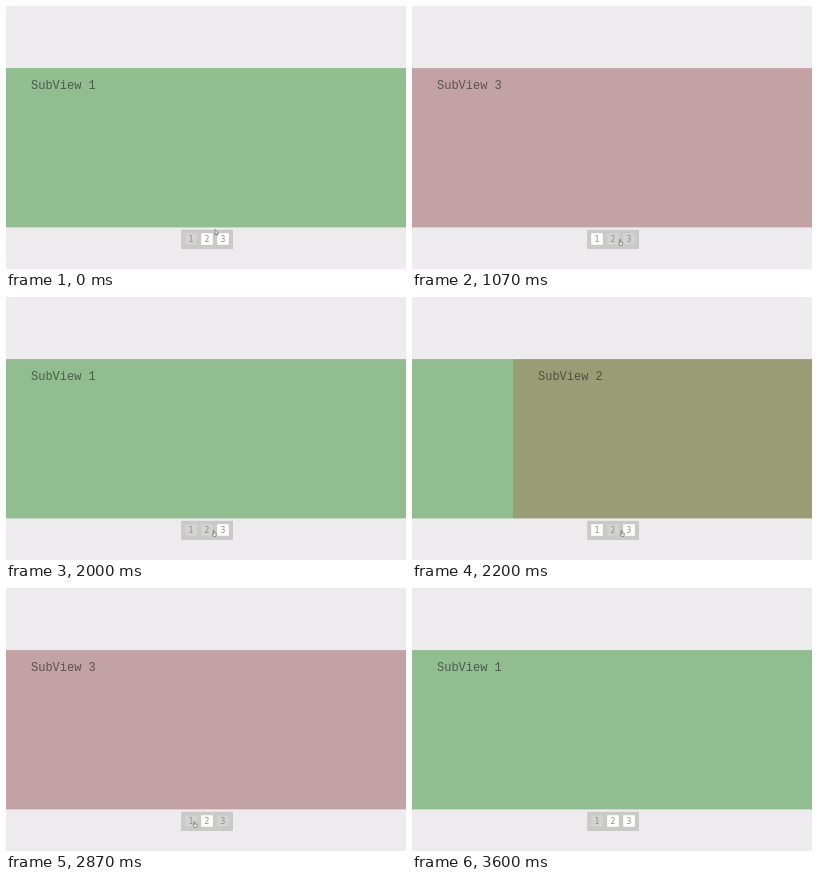
Write an HTML page with a canvas that moves like this. It is 400 by 263 pixels and loops after 4140 ms.

```html
<!DOCTYPE html>
<html lang="en">
<head>
<meta charset="utf-8">
<title>Sliding subviews</title>
<style>
  html, body { margin: 0; width: 100%; height: 100%; overflow: hidden; background: #edebee; }
  canvas { display: block; }
</style>
</head>
<body>
<canvas width="400" height="263"></canvas>
<script>
const ctx = document.querySelector('canvas').getContext('2d');
const LOOP = 4140, STEPS_PER_MS = 0.015, WIDTH = 400;
const SLIDE_STEPS = 2, TRAVEL_STEPS = 5, EXIT_STEP = 48;
const colors = ['#91bd90', '#999d76', '#c2a2a4'];
const clicks = [
  { at: 6.56, view: 1 }, { at: 14, view: 2 }, { at: 24.25, view: 0 },
  { at: 31.67, view: 1 }, { at: 39, view: 2 }, { at: 45.5, view: 0 }
];

// After each click the pointer heads for the next button, and finally out of the top
const buttonTips = [184, 206.5, 219];
const moves = clicks.map(({ view }, i) => ({
  at: i ? clicks[i - 1].at : 0, x: buttonTips[view], y: 233
}));
moves.push({ at: EXIT_STEP, x: 211, y: 3 });

const arrow = new Path2D('M0 0V7L1.6 5.6L2.7 8L3.8 7.4L2.8 5.2H5Z');
const hand = new Path2D('M1 0H2V3L5 3.8V6L4 8H1.3L-.5 5L0 4.2L1 5Z');

function swing(step, start, duration) {
  const p = Math.min(1, Math.max(0, (step - start) / duration));
  return 0.5 - Math.cos(Math.PI * p) / 2;
}

function rect(color, x, y, w, h) {
  ctx.fillStyle = color;
  ctx.fillRect(x, y, w, h);
}

function label(text, x, y, font, color) {
  ctx.font = font;
  ctx.fillStyle = color;
  ctx.fillText(text, x, y);
}

function slideState(step) {
  let offset = 0, selected = 0;
  for (const { at, view } of clicks) {
    if (step < at) break;
    offset += (view * WIDTH - offset) * swing(step, at, SLIDE_STEPS);
    selected = view;
  }
  return { offset, selected };
}

function pointerAt(step) {
  let x = 209, y = 223;
  for (const move of moves) {
    const p = swing(step, move.at, TRAVEL_STEPS);
    x += (move.x - x) * p;
    y += (move.y - y) * p;
  }
  return { x, y };
}

function drawPointer({ x, y }) {
  const shape = y > 228 ? hand : arrow;
  ctx.save();
  ctx.translate(x, y + 0.5);
  ctx.scale(0.75, 0.75);
  ctx.fillStyle = '#eee';
  ctx.strokeStyle = '#707070';
  ctx.fill(shape);
  ctx.stroke(shape);
  ctx.restore();
}

function drawButtons(selected, pointer) {
  rect('#c9c9c8', 175.2, 223.8, 51.8, 19.2);
  ctx.textAlign = 'center';
  for (let i = 0; i < colors.length; i++) {
    const x = 179 + i * 16;
    const hover = pointer.y > 227 && pointer.x >= x && pointer.x < x + 12;
    rect(i === selected || hover ? '#d3d3d2' : '#fefefd', x + 0.2, 227.2, 11.6, 11.6);
    label(i + 1, x + 6, 236, '8px "DejaVu Sans Mono", monospace', '#8f8f8f');
  }
  ctx.textAlign = 'left';
}

function draw(step) {
  const { offset, selected } = slideState(step);
  const pointer = pointerAt(step);
  rect('#edebee', 0, 0, WIDTH, 263);
  colors.forEach((color, i) => {
    const x = Math.round(i * WIDTH - offset);
    rect(color, x, 62.1, WIDTH, 159.3);
    label('SubView ' + (i + 1), x + 25, 83, '12px "Liberation Mono", monospace', 'rgba(40,40,40,.65)');
  });
  drawButtons(selected, pointer);
  if (step <= EXIT_STEP + TRAVEL_STEPS) drawPointer(pointer);
}

// The pose advances in steps of 1/15 s
function frame() {
  draw(Math.floor((performance.now() % LOOP + 4) * STEPS_PER_MS));
  requestAnimationFrame(frame);
}
frame();
</script>
</body>
</html>
```
